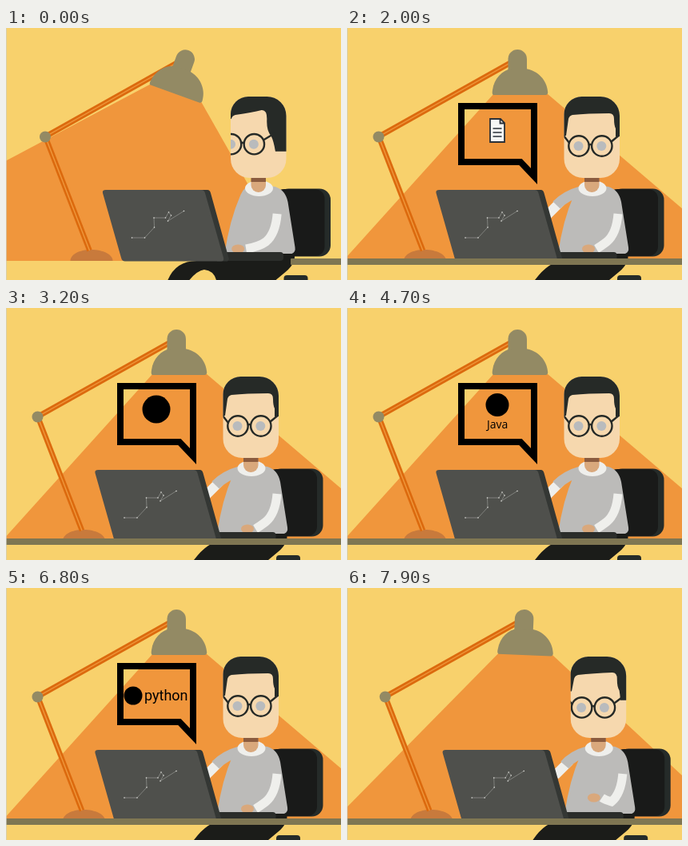
These frames come from a looping animation (419x316 px, 8000 ms). An HTML page with a canvas:

```html
<!DOCTYPE html>
<html lang="en">
<head>
<meta charset="utf-8">
<title>At the desk</title>
<style>
  html, body { margin: 0; width: 100%; height: 100%; overflow: hidden; background: #f8d16c; }
  canvas { display: block; width: 419px; height: 316px; }
</style>
</head>
<body>
<canvas id="stage" width="419" height="316"></canvas>
<script>
const ctx = document.getElementById('stage').getContext('2d');
const W = 419, H = 316, LOOP = 8000, STEP = 100;

const C = {
  wall: '#f8d16c', light: '#f0963c', lamp: '#938a64', arm: '#dc6a0e', groove: '#f09a3e',
  foot: '#c87a3c', desk: '#7f7652', lid: '#4f504c', edge: '#343734',
  base: '#2b2d2a', chair: '#191a19', rim: '#252b29', pants: '#1b1c19',
  wool: '#bcbbb9', cuff: '#efefec', skin: '#f6d8ae', hand: '#d9a87c',
  shade: '#8b5c40', hair: '#262a27', eye: '#b9bbbd'
};

// Keyframed values: [time, value], eased between neighbours.
const track = {
  drift: [[0, 9.5], [1000, 14], [1900, 0], [7300, 0], [7900, 8.2]],
  swing: [[0, 20], [800, 0], [7300, 0], [7900, 2.5]],
  turn: [[0, .78], [400, 1], [1100, 1], [1900, 0], [7300, 0], [7900, .2]],
  lid: [[0, 1], [1000, .75], [1700, 1]],
  lift: [[0, 0], [7300, 0], [7900, 14]],
  desk: [[0, 357], [200, 430], [1200, 430], [1700, 0]],
  bubble: [[1500, 0], [1800, 1], [7200, 1], [7500, 0]]
};

function at(name, t) {
  const keys = track[name];
  if (t <= keys[0][0]) return keys[0][1];
  for (let i = 1; i < keys.length; i++) {
    const [t0, a] = keys[i - 1], [t1, b] = keys[i];
    if (t < t1) {
      const u = (t - t0) / (t1 - t0);
      return a + (b - a) * u * u * (3 - 2 * u);
    }
  }
  return keys[keys.length - 1][1];
}

function shape(color, d) {
  ctx.fillStyle = color;
  ctx.fill(new Path2D(d));
}

function line(color, width, d) {
  ctx.strokeStyle = color;
  ctx.lineWidth = width;
  ctx.stroke(new Path2D(d));
}

function oval(color, x, y, rx, ry = rx) {
  ctx.fillStyle = color;
  ctx.beginPath();
  ctx.ellipse(x, y, rx, ry, 0, 0, Math.PI * 2);
  ctx.fill();
}

function box(color, x, y, w, h, r = 0) {
  ctx.fillStyle = color;
  ctx.beginPath();
  ctx.roundRect(x, y, w, h, r);
  ctx.fill();
}

function rod(d) {
  line(C.arm, 6.6, d);
  line(C.groove, 1.3, d);
}

function swung(angle, draw) {
  ctx.save();
  ctx.translate(213, 43);
  ctx.rotate(angle * Math.PI / 180);
  ctx.translate(-213, -43);
  draw();
  ctx.restore();
}

function drawLamp(angle) {
  ctx.save();
  ctx.beginPath();
  ctx.rect(-60, 0, W + 120, 292);
  ctx.clip();
  swung(angle, () => shape(C.light, 'M184 82L-381 710L926 659L250 82Z'));
  ctx.restore();

  shape(C.foot, 'M71 292C71 284 82 278 97 278S124 284 124 292Z');
  rod('M40 137L95 279');
  rod('M40 136L209 41');
  oval(C.lamp, 39.5, 136.5, 7);
  swung(angle, () => {
    box(C.lamp, 201.5, 27, 23.5, 34, [12, 12, 0, 0]);
    shape(C.lamp, 'M183 84Q181 83 182 78C184 63 194 53 206 51H223C239 53 250 66 251 79Q252 83 249 84Z');
  });
}

function drawBody(k) {
  box(C.rim, 330, 201.5, 66.5, 85, 14);
  box(C.chair, 326, 202, 63, 84, 12);
  box(C.rim, 338, 310, 30, 12, 4);

  const tip = 235 - 54 * k;
  shape(C.pants, `M${tip} 316Q${tip + 18 - 10 * k} 292 ${tip + 36} 292L264 278H350Q356 293 340 306L328 316Z`);
  const gap = Math.max(0, 120 * (k - .5));
  if (gap) {
    const g = tip + 27;
    shape(C.wall, `M${g} 316Q${g + 10} 304 ${g + gap * .55} 303Q${g + gap * .9} 304 ${g + gap} 316Z`);
  }
}

function drawTorso(k, lift) {
  if (k < .6) {
    const s = 10 * k;
    line(C.cuff, 12, `M${250 + s} 235L${268 + s} 217`);
    line(C.wool, 13, `M${262 + s} 222Q274 210 292 205`);
  }
  shape(C.wool, 'M299 195Q289 198 284 209Q270 241 264 283H348Q353 281 352 275L343 218Q340 203 327 199Z');

  const elbow = 339 - 12 * k;
  const hx = 302 - 35 * k * k, hy = 277 - lift;
  line(C.cuff, 11, `M${elbow} 233Q${elbow - 2} 258 ${elbow - 14} 268Q${elbow - 22} ${274 - lift * .6} ${hx + 10} ${hy}`);
  oval(C.hand, hx, hy, 8, 5.5);

  oval(C.cuff, 307, 201, 17.5, 10);
  box(C.hand, 297, 190, 18.5, 16, [0, 0, 9, 9]);
  box(C.shade, 297, 184, 18.5, 9);
}

function drawHead(k, nod) {
  ctx.save();
  ctx.beginPath();
  ctx.roundRect(271.5, 86, 69.5, 102, [22, 24, 24, 24]);
  ctx.clip();
  box(C.skin, 271, 86, 71, 102);

  const left = 277 - 6 * k, low = 135 - 28 * k;
  const right = 334 - 23 * k, burn = 136 + 24 * k;
  shape(C.hair, `M270 84H343V${burn}H${336 - 11 * k}Q${336 - 14 * k} ${130 + 14 * k} ${336 - 18 * k} ${126 + 12 * k}` +
    `Q${right} ${122 + 8 * k} ${right + k} 114Q${right + k} ${107 - 6 * k} ${right - 6} ${107 - 5 * k}` +
    `Q${300 - 2 * k} ${107 - k} ${left + 5} 109Q${left + 1} 110 ${left} 114L${left - 3} ${low}H270Z`);

  const x = 290 - 23 * k, y = 148 - 3 * k + nod;
  for (const cx of [x, x + 28.8]) {
    oval(C.eye, cx - .5, y, 6);
    ctx.strokeStyle = C.hair;
    ctx.lineWidth = 2.4;
    ctx.beginPath();
    ctx.arc(cx, y, 12.7, 0, Math.PI * 2);
    ctx.stroke();
  }
  line(C.hair, 2.4, `M${x + 12} ${y - 1}Q${x + 14} ${y - 3} ${x + 16.5} ${y - 1}` +
    `M${x - 12} ${y - 4}L${x - 19} ${y - 13}` +
    `M${x + 40} ${y - 5}L${341 - 18 * k} ${y - 14}`);
  ctx.restore();
}

function drawLaptop(w) {
  const half = 63.5 * w, mid = 187;
  const tl = mid - 12 - half, tr = mid - 12 + half, bl = tl + 24, br = tr + 24;
  box(C.base, br - 4, 281, 79 - 40 * (1 - w), 11, [0, 4, 4, 0]);
  const e = 7 - 5 * (1 - w);
  shape(C.edge, `M${tr - 6} 203H${tr + e - 3}Q${tr + e} 203 ${tr + e + 1} 207L${br + e} 290L${br + e - 2} 292.5H${br - 8}Z`);
  shape(C.lid, `M${tl + 4} 203H${tr - 4}Q${tr} 203 ${tr + 1} 207L${br} 288Q${br + 1} 292.5 ${br - 3} 292.5` +
    `H${bl + 4}Q${bl} 292.5 ${bl - 1} 288L${tl} 207Q${tl - 1} 203 ${tl + 4} 203Z`);

  const stars = [[148, 263], [164, 263], [176, 250], [175.5, 238], [190, 238],
    [194, 231], [197, 235], [193, 242], [213, 229.5]];
  line('#969793', .7, 'M' + stars.map(p => p.join(' ')).join('L'));
  for (const [x, y] of stars) oval('#e2e2de', x, y, .8);
}

function label(text, font, x, y) {
  ctx.fillStyle = '#000';
  ctx.font = font;
  ctx.textBaseline = 'alphabetic';
  ctx.fillText(text, x, y);
}

const topics = [
  [0, () => {
    shape('#f5f6f5', 'M179 114H192L197 119V143H179Z');
    line('#2a3038', 1.8, 'M179 114H192L197 119V143H179ZM191.5 114V119.5H197');
    line('#2a3038', 1.6, 'M182.5 126H193.5M182.5 131H193.5M182.5 136H193.5');
  }],
  [2700, () => oval('#000', 188, 127, 17.5)],
  [4100, () => {
    oval('#000', 188, 121.5, 14.5);
    label('Java', '14px "Open Sans", "Noto Sans", sans-serif', 175, 151);
  }],
  [5700, () => {
    oval('#000', 159, 135, 11.5);
    label('python', '18px Roboto, "Liberation Sans", sans-serif', 173, 140.5);
  }]
];

function drawBubble(size, t) {
  if (size <= 0) return;
  ctx.save();
  ctx.translate(238, 197);
  ctx.scale(size, size);
  ctx.translate(-238, -197);
  line('#000', 8, 'M143 98H234V186L217 168H143Z');

  const [start, draw] = topics.filter(([from]) => t >= from).pop();
  const pop = start ? Math.min(1, .5 + (t - start) / 400) : 1;
  ctx.translate(188, 133);
  ctx.scale(pop, pop);
  ctx.translate(-188, -133);
  draw();
  ctx.restore();
}

function render(t) {
  const turn = at('turn', t), lift = at('lift', t);
  box(C.wall, 0, 0, W, H);
  ctx.save();
  ctx.translate(at('drift', t), 0);
  drawLamp(at('swing', t));
  drawBody(turn);
  drawTorso(turn, lift);
  drawHead(turn, lift * .18);
  drawLaptop(at('lid', t));
  ctx.restore();

  box(C.desk, at('desk', t) - 1, 289, W + 2, 8, 1);
  drawBubble(at('bubble', t), t);
  box('rgba(205,205,190,.7)', 0, 0, 1, H);
}

const begin = performance.now();
function tick(now) {
  const t = Math.max(0, now - begin) % LOOP;
  render(Math.floor(t / STEP) * STEP);
  requestAnimationFrame(tick);
}
render(0);
requestAnimationFrame(tick);
</script>
</body>
</html>
```
